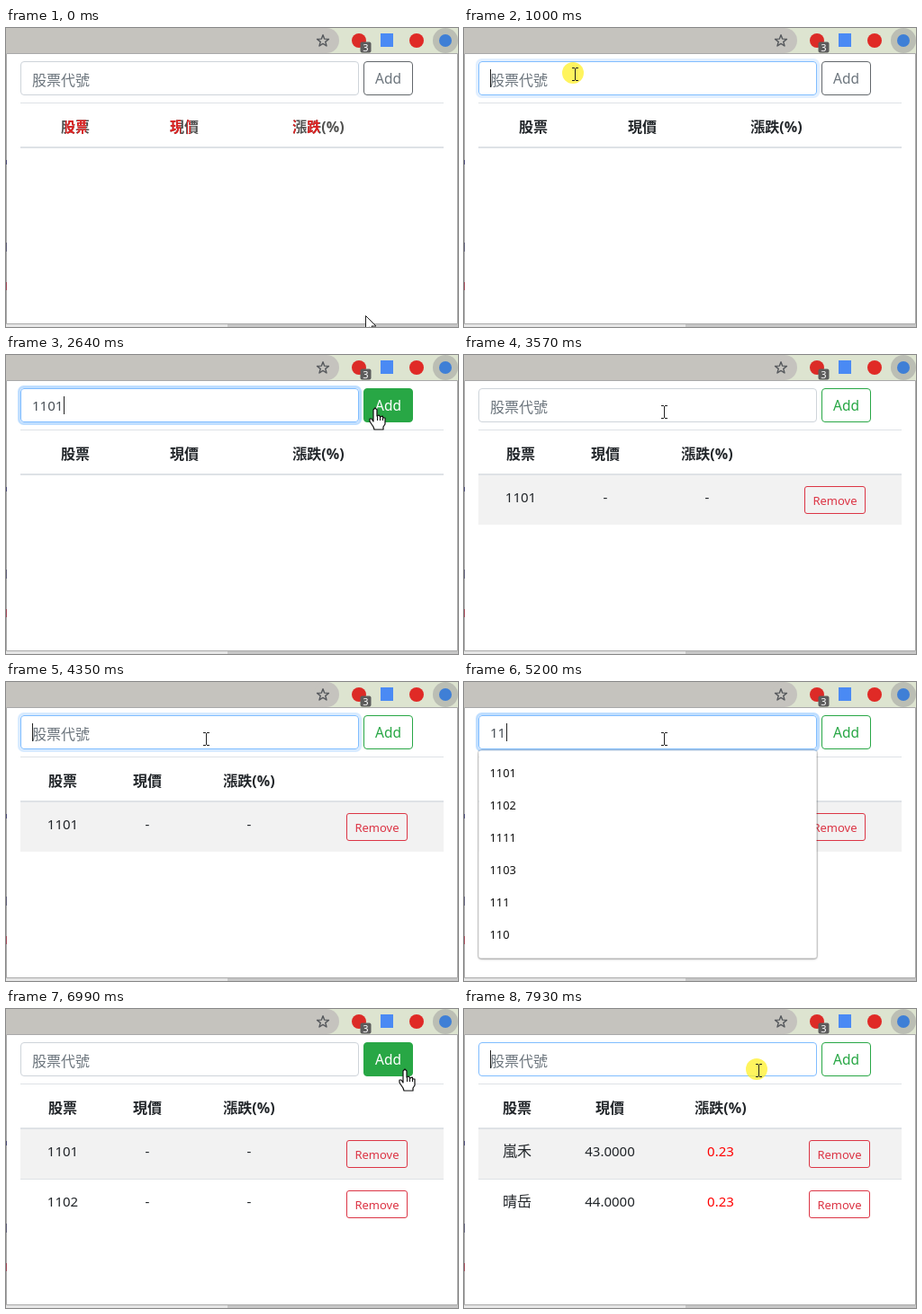
An HTML page with a canvas for the animation above (8000 ms loop, 502 by 333 pixels).

```html
<!DOCTYPE html>
<html lang="zh-Hant">
<head>
<meta charset="utf-8">
<title>Stock watch list</title>
<style>
html, body { margin: 0; width: 100%; height: 100%; overflow: hidden; background: #fff; }
canvas { display: block; }
</style>
</head>
<body>
<canvas id="stage" width="502" height="333"></canvas>
<script>
const ctx = document.getElementById('stage').getContext('2d');
const LOOP = 8000;
const FONT = '"Noto Sans", "Noto Sans CJK TC", "Noto Sans CJK", sans-serif';
const INK = '#212529', GREEN = '#28a745', RED = '#dc3545', LINE = '#dee2e6';

// Each session: click the field, type a code, press Add.
const sessions = [
  { focus: 930, open: 1160, keys: [1480, 1780, 2010, 2320], code: '1101', add: 3020, row: 3099 },
  { focus: 4260, open: 4430, keys: [4810, 5200, 5450, 5680], code: '1102', add: 6530, row: 6686 },
  { focus: 7930, open: 9000, keys: [], code: '', add: 9000, row: 9000 }
];
const suggestions = [
  ['1101', '1102', '2330', '1111', '1103', '2317'],
  ['1101', '1102', '1111', '1103', '1301', '111'],
  ['1101', '1102', '1111', '1103', '111', '110'],
  ['1101', '1102', '1103', '110']
];
const PRICED = 7000;
const stocks = [
  { code: '1101', name: '嵐禾', price: '43.0000', change: '0.23' },
  { code: '1102', name: '晴岳', price: '44.0000', change: '0.23' }
];
const layouts = {
  empty: { cols: [77, 198, 347] },
  pending: { cols: [63, 157, 270], remove: 378 },
  priced: { cols: [59, 162, 285], remove: 383 }
};

// Pointer moves advance in discrete steps: first step, last step, count, target.
const START = [399, 320];
const moves = [
  [70, 530, 7, 123, 51],
  [2400, 2640, 4, 410, 60],
  [2700, 2701, 1, 412, 61],
  [3177, 3570, 6, 222, 63],
  [5980, 6300, 5, 437, 57],
  [6842, 7310, 7, 468, 111],
  [7390, 7930, 8, 327, 68]
];
const ease = p => p * p * (3 - 2 * p);

function pointerAt(t) {
  let [x, y] = START;
  for (const [from, to, count, tx, ty] of moves) {
    if (t < from) break;
    const step = Math.min(count, 1 + Math.floor((t - from) / (to - from) * (count - 1) + 1e-6));
    const p = ease(step / count);
    x += (tx - x) * p;
    y += (ty - y) * p;
  }
  const inRow = y > 37 && y < 75;
  const kind = inRow && x > 16 && x < 392 ? 'beam' : inRow && x > 397 && x < 452 ? 'hand' : 'arrow';
  return { x: Math.round(x), y: Math.round(y), kind };
}

function rect(x, y, w, h, color) {
  ctx.fillStyle = color;
  ctx.fillRect(x, y, w, h);
}

function circle(x, y, r, color) {
  ctx.fillStyle = color;
  ctx.beginPath();
  ctx.arc(x, y, r, 0, 7);
  ctx.fill();
}

function box(x, y, w, h, r, fill, stroke) {
  ctx.beginPath();
  ctx.roundRect(x + .5, y + .5, w - 1, h - 1, r);
  if (fill) { ctx.fillStyle = fill; ctx.fill(); }
  if (stroke) { ctx.strokeStyle = stroke; ctx.lineWidth = 1; ctx.stroke(); }
}

function ring(x, y, w, h, color) {
  ctx.beginPath();
  ctx.roundRect(x - 1.5, y - 1.5, w + 3, h + 3, 5);
  ctx.strokeStyle = color;
  ctx.lineWidth = 3;
  ctx.stroke();
}

function text(str, x, y, size, color, align = 'left', weight = 400) {
  ctx.font = `${weight} ${size}px ${FONT}`;
  ctx.textAlign = align;
  ctx.fillStyle = color;
  ctx.fillText(str, x, y);
}

function shape(points, dx, dy, fill, stroke, width = 1) {
  ctx.beginPath();
  points.forEach(([x, y]) => ctx.lineTo(x + dx, y + dy));
  ctx.closePath();
  ctx.lineJoin = 'round';
  if (fill) { ctx.fillStyle = fill; ctx.fill(); }
  ctx.strokeStyle = stroke;
  ctx.lineWidth = width;
  ctx.stroke();
}

function drawBrowser() {
  rect(0, 0, 502, 333, '#dde4d0');
  rect(0, 0, 356, 28, '#c5c3be');
  circle(356, 14, 14, '#c5c3be');
  const star = Array.from({ length: 10 }, (_, i) => {
    const a = i * Math.PI / 5 - Math.PI / 2, r = i % 2 ? 2.9 : 6.8;
    return [r * Math.cos(a), r * Math.sin(a)];
  });
  shape(star, 352, 14.5, null, '#55585c', 1.4);
  circle(392, 14, 8, '#dc2b27');
  box(393, 15, 13, 13, 2, '#5c5c5c');
  text('3', 399.5, 26, 11, '#fff', 'center');
  rect(416, 6, 14, 15, '#4a8af4');
  circle(456, 14, 8, '#e02a26');
  circle(488, 14, 14, '#bbbeb4');
  circle(488, 14, 7, '#3f7fd6');
  rect(0, 330, 246, 3, '#e6e6e6');
  rect(246, 330, 256, 3, '#c6c6c6');
  box(0, 28, 502, 302, 0, '#fff', '#a9a9a9');
  rect(0, 147, 1, 5, '#4c4c78');
  rect(0, 239, 1, 10, '#60607a');
  rect(0, 283, 1, 9, '#a34a5a');
}

function drawField(t, session) {
  const glow = session ? Math.max(0, Math.min(1, (t - session.focus) / 150)) : 0;
  const focused = session && t < session.add;
  if (focused && glow) ring(16, 37, 376, 38, `rgba(0,123,255,${.25 * glow})`);
  box(16, 37, 376, 38, 3.5, '#fff', focused && glow ? '#80bdff' : '#ced4da');

  const typed = session && t < session.row ? session.keys.filter(k => t >= k).length : 0;
  if (typed) text(session.code.slice(0, typed), 29, 62, 15, '#495057');
  else text('股票代號', 29, 63.5, 16, '#6c757d');

  if (!focused) return;
  const lastEdit = typed ? session.keys[typed - 1] : session.focus;
  if ((t - lastEdit) % 1100 < 550) {
    rect(Math.round(29 + typed * 8.75), 46, 1, 20, '#222');
  }
}

function drawAdd(t, hover, session) {
  if (session && t >= session.add && t < session.add + 230) ring(397, 37, 55, 38, 'rgba(40,167,69,.45)');
  const first = t < 2600;
  box(397, 37, 55, 38, 3.5, hover ? GREEN : '#fff', hover ? GREEN : first ? '#62676b' : GREEN);
  text('Add', 424.5, 62, 15.5, hover ? '#fff' : first ? '#6c757d' : GREEN, 'center');
}

function drawHeader(cols, color) {
  ['股票', '現價', '漲跌(%)'].forEach((label, i) => text(label, cols[i], 115.5, 16, color, 'center', 700));
}

function drawTable(t) {
  const rows = stocks.filter((_, i) => t >= sessions[i].row);
  const priced = t >= PRICED;
  const { cols, remove } = layouts[!rows.length ? 'empty' : priced ? 'priced' : 'pending'];

  rect(16, 83, 470, 1, LINE);
  rect(16, 132, 470, 2, LINE);
  drawHeader(cols, t < 930 ? '#50504f' : INK);
  if (t < 930) {
    // Red flecks left on the header until it is first repainted.
    ctx.save();
    ctx.beginPath();
    [[66, 10], [79, 10], [182, 12], [201, 4], [318, 4], [335, 13]].forEach(([x, w]) => ctx.rect(x, 98, w, 22));
    ctx.clip();
    drawHeader(cols, '#e02222');
    ctx.restore();
  }

  rows.forEach((stock, i) => {
    const y = 133 + 56 * i;
    if (i) rect(16, y, 470, 1, LINE);
    else rect(16, y + 1, 470, 55, '#f2f2f2');
    text(priced ? stock.name : stock.code, cols[0], y + 31, priced ? 16 : 15, INK, 'center');
    text(priced ? stock.price : '-', cols[1], y + 31, 15, INK, 'center');
    text(priced ? stock.change : '-', cols[2], y + 31, 15, priced ? '#f00' : INK, 'center');
    box(remove, y + 13, 68, 31, 2.5, null, RED);
    text('Remove', remove + 34, y + 34, 13, RED, 'center');
  });
}

function drawDropdown(t, session) {
  if (!session || t < session.open || t >= session.keys[3]) return;
  const [first, second, third] = session.keys;
  const items = suggestions[[first + 70, second, third + 80].filter(k => t >= k).length];
  ctx.save();
  ctx.shadowColor = 'rgba(0,0,0,.35)';
  ctx.shadowBlur = 3;
  ctx.shadowOffsetY = 1;
  box(16, 76, 376, 16 + 36 * items.length, 3, '#fff');
  ctx.restore();
  box(15, 75, 378, 18 + 36 * items.length, 3, null, 'rgba(0,0,0,.13)');
  items.forEach((item, i) => text(item, 28.5, 106 + 36 * i, 12.8, '#111'));
}

const arrowPoints = [[0, 0], [0, 16], [4, 12.5], [6.5, 18], [9, 17], [6.5, 11.5], [11.5, 11.5]];
const handPoints = [
  [-2, 1], [0, -1], [2, 1], [2, 8], [4, 7], [6, 9], [8, 8], [9, 10], [11, 10], [11, 17],
  [9, 20], [9, 23], [-1, 23], [-2, 20], [-6, 14], [-6, 11], [-4, 11], [-2, 14]
];

function drawPointer({ x, y, kind }) {
  if (kind === 'arrow') shape(arrowPoints, x + .5, y + .5, '#fff', '#222');
  else if (kind === 'hand') {
    shape(handPoints, x, y, '#fff', '#111', 1.2);
    [2, 5, 8].forEach(dx => rect(x + dx, y + 8, 1, 5, '#111'));
  } else {
    rect(x, y - 6, 1, 13, '#222');
    [-7, 7].forEach(dy => {
      rect(x - 3, y + dy, 3, 1, '#222');
      rect(x + 1, y + dy, 3, 1, '#222');
    });
  }
}

function draw(t) {
  const session = sessions.filter(s => t >= s.focus).pop();
  const pointer = pointerAt(t);
  const clicked = sessions.some(s => [s.focus, s.add].some(c => t >= c && t < c + 75));
  drawBrowser();
  drawTable(t);
  drawField(t, session);
  drawAdd(t, pointer.kind === 'hand', session);
  drawDropdown(t, session);
  if (clicked) circle(pointer.x - 2, pointer.y - 1, 12, 'rgba(255,240,40,.75)');
  drawPointer(pointer);
}

const began = performance.now();
(function frame() {
  draw((performance.now() - began) % LOOP);
  requestAnimationFrame(frame);
})();
</script>
</body>
</html>
```
